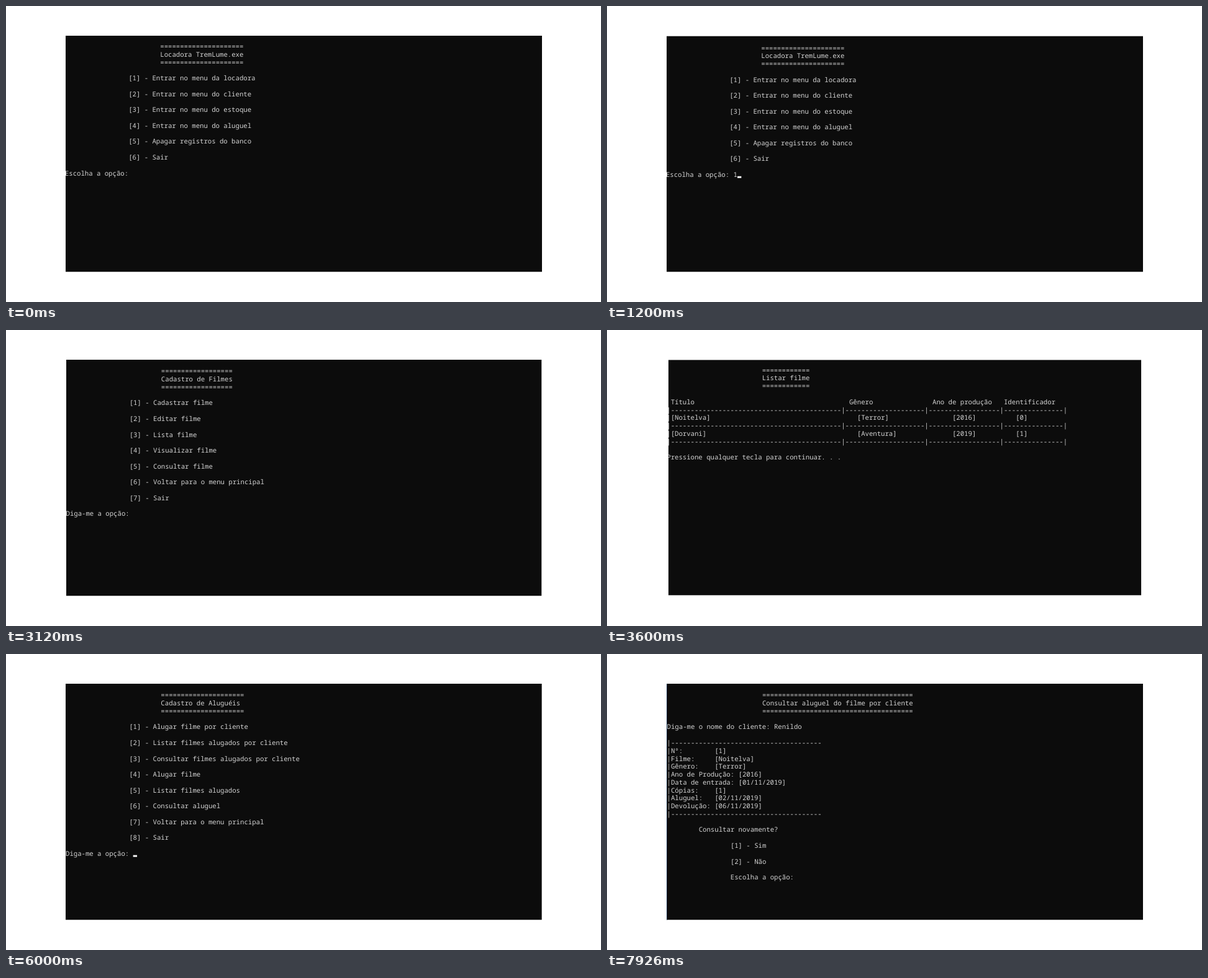
An HTML page that plays this animation: 958x478 px, repeating every 8.41 s.

```html
<!DOCTYPE html>
<html lang="pt-BR">
<head>
<meta charset="utf-8">
<title>Locadora</title>
<style>
  html, body { margin: 0; width: 100%; height: 100%; overflow: hidden; background: #fff; }
  #stage { display: block; width: 958px; height: 478px; }
  text {
    font: 10.65px "Noto Sans Mono", "DejaVu Sans Mono", monospace;
    fill: #d4d4d4;
    white-space: pre;
    text-rendering: geometricPrecision;
  }
  /* Each screen holds 1210 of 8410 ms; the next one covers it after 1200. */
  .screen { visibility: hidden; animation: show 8410ms step-end infinite; }
  @keyframes show {
    0% { visibility: visible; }
    14.38763% { visibility: hidden; }
  }
</style>
</head>
<body>
<svg id="stage" viewBox="0 0 958 478"></svg>
<script>
const LOOP = 8410, STEP = 1200, COL = 6.39, ROW = 12.77;

const indent = (n, s) => ' '.repeat(n) + s;
const title = (s, width = s.length) => {
  const bar = indent(24, '='.repeat(width));
  return [bar, indent(24, s), bar, ''];
};
const options = names => names.flatMap((s, i) => [indent(16, `[${i + 1}] - ${s}`), '']);
const rule = (...widths) => '|' + widths.map(n => '-'.repeat(n)).join('|');
// Takes column, text, column, text, ...
const cells = (...parts) => {
  let line = '';
  for (let i = 0; i < parts.length; i += 2) line = line.padEnd(parts[i]) + parts[i + 1];
  return line;
};
const field = (name, value) => `|${name}:`.padEnd(12) + `[${value}]`;

const mainMenu = [
  ...title('Locadora TremLume.exe'),
  ...options(['Entrar no menu da locadora', 'Entrar no menu do cliente',
    'Entrar no menu do estoque', 'Entrar no menu do aluguel',
    'Apagar registros do banco', 'Sair'])
];
const filmRule = rule(43, 20, 18, 15) + '|';
const clientRule = rule(43, 20, 31) + '|';
const rentRule = rule(38);
const pause = 'Pressione qualquer tecla para continuar. . .';

// box: left, top, right, bottom; x, y: first column and first baseline; cursor: column, row
const screens = [
  { box: [96, 48, 863, 429.5], x: 94.9, y: 69.2, lines: [...mainMenu, 'Escolha a opção:'] },
  { box: [96, 48.4, 863, 429.5], x: 94.9, y: 71.6, cursor: [18, 16],
    lines: [...mainMenu, 'Escolha a opção: 1'] },
  { box: [97, 48, 862.5, 429.5], x: 96.5, y: 70.4, lines: [
    ...title('Cadastro de Filmes'),
    ...options(['Cadastrar filme', 'Editar filme', 'Lista filme', 'Visualizar filme',
      'Consultar filme', 'Voltar para o menu principal', 'Sair']),
    'Diga-me a opção:'
  ] },
  { box: [98.7, 48.2, 860.3, 428.6], x: 96.3, y: 68.7, lines: [
    ...title('Listar filme'),
    cells(1, 'Título', 46, 'Gênero', 67, 'Ano de produção', 85, 'Identificador'),
    filmRule,
    cells(0, '|[Noitelva]', 48, '[Terror]', 72, '[2016]', 88, '[0]'),
    filmRule,
    cells(0, '|[Dorvani]', 48, '[Aventura]', 72, '[2019]', 88, '[1]'),
    filmRule, '', pause
  ] },
  { box: [96.5, 48, 862, 429.5], x: 95.5, y: 69.2, cursor: [45, 9], lines: [
    ...title('Listar cliente'),
    cells(1, 'Nome', 45, 'CPF', 78, 'Email'),
    clientRule,
    cells(0, '|[Renildo]', 48, '[12345678900]', 72, '[Renildo12@mail.example]'),
    clientRule, '', pause
  ] },
  { box: [96, 48, 862.8, 429.5], x: 96, y: 70.4, cursor: [17, 20], lines: [
    ...title('Cadastro de Aluguéis', 21),
    ...options(['Alugar filme por cliente', 'Listar filmes alugados por cliente',
      'Consultar filmes alugados por cliente', 'Alugar filme', 'Listar filmes alugados',
      'Consultar aluguel', 'Voltar para o menu principal', 'Sair']),
    'Diga-me a opção:'
  ] },
  { box: [96, 48, 863, 429.5], x: 96.6, y: 70.4, edge: '#0b2947', lines: [
    ...title('Consultar aluguel do filme por cliente'),
    'Diga-me o nome do cliente: Renildo', '',
    rentRule,
    field('Nº', 1), field('Filme', 'Noitelva'), field('Gênero', 'Terror'),
    '|Ano de Produção: [2016]', '|Data de entrada: [01/11/2019]',
    field('Cópias', 1), field('Aluguel', '02/11/2019'), field('Devolução', '06/11/2019'),
    rentRule, '',
    indent(8, 'Consultar novamente?'), '',
    ...options(['Sim', 'Não']),
    indent(16, 'Escolha a opção:')
  ] }
];

const rect = (x, y, w, h, fill) =>
  `<rect x="${x}" y="${y}" width="${w}" height="${h}" fill="${fill}"/>`;

function draw({ box: [l, t, r, b], x, y, cursor, edge, lines }, i) {
  const w = r - l, h = b - t;
  const text = lines.map((line, row) => {
    const s = line.trimStart();
    const left = x + (line.length - s.length) * COL;
    return s && `<text x="${left.toFixed(2)}" y="${(y + row * ROW).toFixed(2)}">${s}</text>`;
  }).join('');
  const caret = cursor
    ? rect(x + cursor[0] * COL, y + cursor[1] * ROW - 1.1, COL, 3, '#f2f2f2') : '';
  return `<g class="screen" style="animation-delay:${i * STEP - LOOP}ms">
    ${rect(0, 0, 958, 478, '#fff')}
    <svg x="${l}" y="${t}" width="${w}" height="${h}" viewBox="${l} ${t} ${w} ${h}">
      ${rect(l, t, w, h, '#0c0c0c')}${edge ? rect(l, t, 1, h, edge) : ''}${text}${caret}
    </svg></g>`;
}

document.getElementById('stage').innerHTML = screens.map(draw).join('');
</script>
</body>
</html>
```
